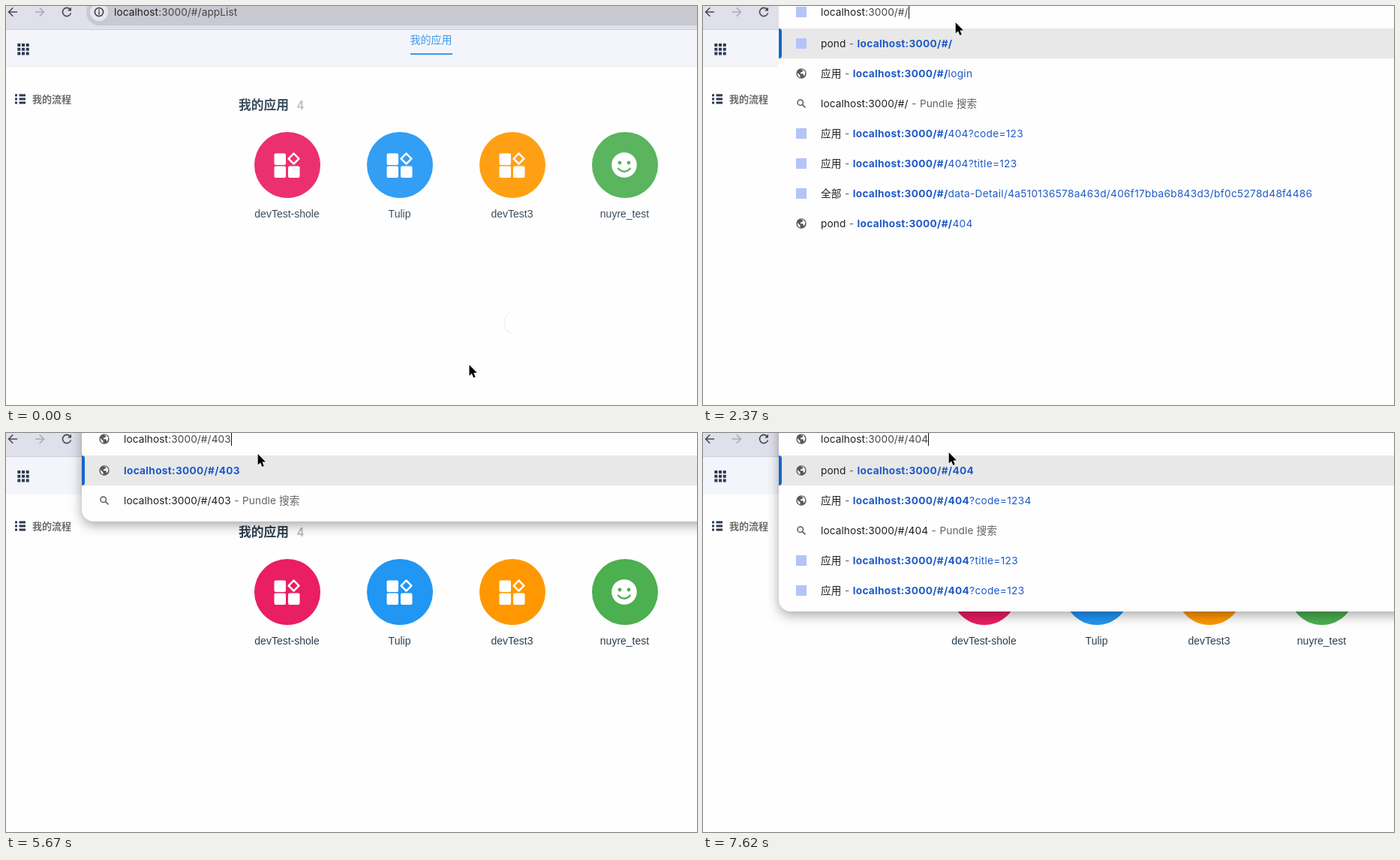
Write an HTML page that moves like this. It is 921 px wide and 532 px high and loops after 8 s.

```html
<!DOCTYPE html>
<html lang="zh-CN">
<head>
<meta charset="utf-8">
<style>
  html, body { margin: 0; width: 100%; height: 100%; overflow: hidden; background: #fefefe; }
  #stage { position: absolute; left: 0; top: 0; width: 100%; height: 100%; overflow: hidden; contain: strict; }
  svg { position: absolute; left: 0; top: 0; overflow: visible; }
  #page { width: 100%; height: 100%; overflow: hidden; fill: #2c3e50;
    font: 14px 'Liberation Sans', Arial, 'Noto Sans CJK SC', 'Noto Sans CJK', sans-serif; }
  .line { position: absolute; left: 0; right: 0; height: 40px; padding-left: 56px; white-space: pre; color: #1f1f1f;
    font: 13.65px/40px Inter, 'Noto Sans CJK SC', 'Noto Sans CJK', sans-serif; letter-spacing: .1px; }
  .line svg { left: 30px; top: 20px; width: 1px; height: 1px; }
  .line i { font-style: normal; color: #5f6368; }
  .line u { text-decoration: none; color: #1f5ac6; letter-spacing: .3px; }
  .line s { text-decoration: none; color: #474747; }
  .line em { font-style: normal; color: #474747; background: #acd0f9; letter-spacing: .3px; }
  .dash { padding: 0 .5px; }
  .caret { display: inline-block; width: 1px; height: 17px; margin-right: -1px; background: #111; vertical-align: -4px; }
  #bar { position: absolute; left: 107px; right: -60px; top: -10px; height: 36px; box-sizing: border-box;
    border: 2px solid #c9c9d2; border-radius: 18px; background: #c9c9d2; }
  #bar.on { background: #fff; border-color: #1059c8; }
  #url { left: -21px; top: -4px; }
  #popup { position: absolute; left: 101px; right: -40px; top: -40px; border-radius: 0 0 0 16px; background: #fefefe; }
  #popup .pick { background: #e8e8e8; }
  #popup .pick::before { content: ''; position: absolute; left: 0; top: 0; width: 4px; height: 40px;
    border-radius: 0 4px 4px 0; background: #1765cc; }
</style>
</head>
<body>
<div id="stage">
<svg id="page">
  <path d="M0 0H921V32H0z" fill="#dfe0ea"/>
  <path d="M0 31.5H921" stroke="#cfd0da"/>
  <path d="M0 32H921V82H0z" fill="#f4f5fa"/>
  <g fill="none" stroke="#474951" stroke-width="1.6">
    <path d="M15 8H4M9.3 2.3L3.6 8L9.3 13.7"/>
    <path d="M39 8H50M44.7 2.3L50.4 8L44.7 13.7" stroke="#a9abb6"/>
    <path d="M85.4 4.4A5.6 5.6 0 1 0 86.5 9.4"/>
    <path d="M87 1.5V6.5H82z" fill="#474951" stroke="none"/>
  </g>
  <g id="grid" fill="#2c3a52"></g>
  <path d="M12 119H15M12 124H15M12 129H15M17.5 119H26M17.5 124H26M17.5 129H26" stroke="#2c3a52" stroke-width="2.8"/>
  <text x="35" y="129" font-size="13" font-weight="bold" fill="#6c6c6c">我的流程</text>
  <text x="538.5" y="50" fill="#3a9bf0">我的应用</text>
  <path d="M539 64H595" stroke="#3a9bf0" stroke-width="2"/>
  <text x="310" y="138" font-size="16.8" font-weight="bold">我的应用</text>
  <text x="388" y="138" font-size="16" font-weight="bold" fill="#b9b9b9">4</text>
  <g id="cards" text-anchor="middle"></g>
  <g id="mask">
    <path d="M310 100H868V498H310z" fill="#fff" opacity=".08"/>
    <path d="M671 409A16 16 0 0 0 674 437" fill="none" stroke="#f1f1f3" stroke-width="1.5"/>
  </g>
</svg>
<div id="bar">
  <svg width="1" height="1"><circle cx="15" cy="16" r="12" fill="#e6e6ee"/>
    <circle cx="15" cy="16" r="5.6" fill="none" stroke="#36383c" stroke-width="1.5"/>
    <path d="M15 12.6V14.2M15 15.2V19.4" stroke="#36383c" stroke-width="1.5"/></svg>
  <div class="line" id="url"></div>
</div>
<div id="popup"></div>
<svg id="pointer" width="1" height="1">
  <path id="arrow" d="M0 0V14.6L3.3 11.5L5.7 17L8.1 16L5.8 10.6H10.3z" fill="#000" stroke="#fff" stroke-width="1.2" paint-order="stroke"/>
  <path id="beam" d="M1 .5Q4.5 .5 4.5 4V14Q4.5 17.5 1 17.5M8 .5Q4.5 .5 4.5 4V14Q4.5 17.5 8 17.5M3 11H6" fill="none" stroke="#222" stroke-width="1.1"/>
</svg>
</div>
<script>
const $ = id => document.getElementById(id);
const show = (id, on) => $(id).style.display = on ? '' : 'none';
const LOOP = 8000, BASE = 'localhost:3000/#/';

// Static page parts
for (let i = 0; i < 9; i++)
  $('grid').innerHTML += `<rect x="${15.3 + i % 3 * 5.7}" y="${50 + (i / 3 | 0) * 5.7}" width="4" height="4"/>`;

const blocks = `<rect x="-17.5" y="-15.5" width="15.5" height="15.5" rx="2"/><rect x="-17.5" y="1.5" width="15.5" height="15.5" rx="2"/>
  <rect x="1" y="1.5" width="15.5" height="15.5" rx="2"/>
  <path d="M8.5 -15.3L15.4 -8.4L8.5 -1.5L1.6 -8.4z" fill="none" stroke="#fff" stroke-width="2.5" stroke-linejoin="round"/>`;
const smile = `<circle cx="-1" r="16.8"/><g fill="#4caf50"><circle cx="-7" cy="-3" r="2.4"/><circle cx="5" cy="-3" r="2.4"/></g>
  <path d="M-9.5 4Q-1 13.5 7.5 4" fill="none" stroke="#4caf50" stroke-width="2.6"/>`;
[['devTest-shole', '#e91e63', blocks], ['Tulip', '#2196f3', blocks],
 ['devTest3', '#ff9800', blocks], ['nuyre_test', '#4caf50', smile]].forEach(([name, color, icon], i) => {
  $('cards').innerHTML += `<g transform="translate(${375 + i * 150} 212)"><circle r="44" fill="${color}"/>
    <g fill="#fff">${icon}</g><text x="-.5" y="70">${name}</text></g>`;
});

// Suggestion list
const ICONS = {
  site: '<rect x="-7" y="-7" width="14" height="14" fill="#b3c4f8"/>',
  globe: `<circle r="6.7" fill="#575b60"/><path d="M-5.2 -1L-1.5 2.6V5.3Q-5.4 4 -5.2 -1zM-1 -5.2L2.2 -4.6L1.6 -2.2L-1 -1.6V.2H2.4L3.4 3.6Q6 .5 4.8 -2.4L2.8 -5Q.8 -6 -1 -5.2z" fill="#fff"/>`,
  find: '<g fill="none" stroke="#575b60" stroke-width="1.5"><circle cx="-1.3" cy="-1.3" r="3.7"/><path d="M1.4 1.4L5.4 5.4"/></g>'
};
const icon = kind => `<svg>${ICONS[kind]}</svg>`;
const dash = '<i class="dash"> - </i>';
const find = ['find'];
const app = (path, kind = 'site') => [kind, '应用', path];
const home = (path, kind = 'globe') => [kind, 'pond', path];
const bare = path => ['globe', '', path];

function row([kind, title, path], typed) {
  if (kind == 'find') return icon(kind) + BASE + typed + dash + '<i>Pundle 搜索</i>';
  return icon(kind) + (title ? title + dash : '') + `<u><b>${BASE + typed}</b>${path.slice(typed.length)}</u>`;
}

const code3 = app('404?code=123'), code4 = app('404?code=1234', 'globe'), title3 = app('404?title=123');
const rootRows = [home('', 'site'), app('login', 'globe'), find, code3, title3,
  ['site', '全部', 'data-Detail/4a510136578a463d/406f17bba6b843d3/bf0c5278d48f4486'], home('404')];
const guessRows = [bare('404?code=1234'), find, code3, title3, home('404')];
const lostRows = [bare('403'), find];

// Each state: start, typed path, completed selection, rows, caret
const STATES = [
  [0, 'appList', ''],
  [1480, '', 'appList'],
  [2370, '', '', rootRows, 1],
  [2520, '', '', rootRows, 1],
  [2820, '4', '04?code=1234', guessRows],
  [2970, '40', '4?code=1234', guessRows],
  [5670, '403', '', lostRows, 1],
  [6120, '403', '', lostRows, 0],
  [6570, '403', '', lostRows, 1],
  [6720, '40', '', [bare('40'), code4, find, home('404'), title3, code3], 1],
  [6870, '404', '?code=1234', [code4, find, home('404'), title3, code3]],
  [7620, '404', '', [home('404'), code4, find, title3, code3], 1]
];

// Pointer: start, x, y, text beam
const POINTS = [
  [0, 617.5, 478.5], [150, 646, 480.5], [300, 668, 474.5], [450, 572, 267.5], [600, 333, 104.5], [750, 303, 8.5],
  [900, 301, 4, 1], [1040, 293, 4, 1], [1190, 293, 5, 1], [1630, 337, 23], [1770, 336.7, 22],
  [5670, 335.7, 28], [5820, 333.7, 29.5], [5970, 329.7, 28.5], [6120, 327.7, 26]
];

const at = (list, t) => list.findLast(item => item[0] <= t);
let shown;

function showState([start, typed, picked, rows, caret]) {
  const address = `localhost<s>:3000/#/${typed}</s>` + (picked && `<em>${picked}</em>`) + (caret ? '<span class="caret"></span>' : '');
  show('bar', !rows);
  show('popup', rows);
  if (!rows) {
    $('bar').className = picked && 'on';
    $('url').innerHTML = address;
    return;
  }
  // The list opens flat; its shadow follows one step later
  $('popup').style.boxShadow = start == 2370 ? 'none' : '0 5px 16px rgba(0,0,0,.34)';
  $('popup').style.height = 78 + rows.length * 40 + 'px';
  $('popup').innerHTML = `<div class="line" style="top:28px">${icon(rows[0][0])}${address}</div>` +
    rows.map((r, i) => `<div class="line ${i ? '' : 'pick'}" style="top:${70 + i * 40}px">${row(r, typed)}</div>`).join('');
}

function frame(now) {
  const t = now % LOOP, state = at(STATES, t), [, x, y, beam] = at(POINTS, t);
  if (state != shown) showState(shown = state);
  show('mask', t < 150);
  show('arrow', !beam);
  show('beam', beam);
  $('pointer').style.transform = `translate(${x}px,${y}px)`;
  requestAnimationFrame(frame);
}
requestAnimationFrame(frame);
</script>
</body>
</html>
```
